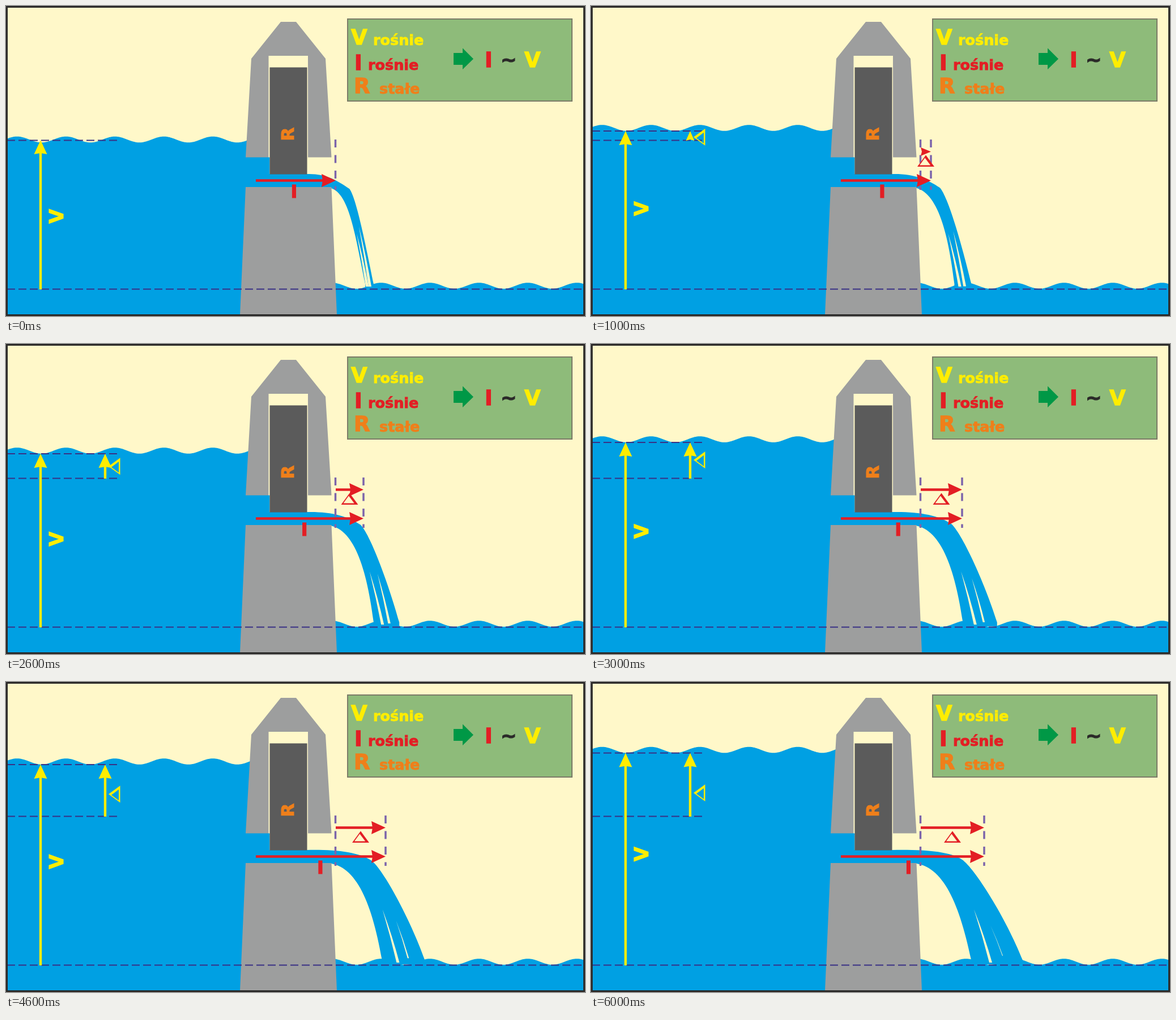
Animation, 1022 px wide and 548 px high, one loop 7 s. Source, as an HTML page with a canvas:

```html
<!DOCTYPE html>
<html lang="pl">
<head>
<meta charset="utf-8">
<title>I ~ V</title>
<style>
  html, body { margin: 0; width: 100%; height: 100%; overflow: hidden; }
  canvas { display: block; width: 1022px; height: 548px; }
</style>
</head>
<body>
<canvas id="stage" width="1022" height="548"></canvas>
<script>
const ctx = document.getElementById('stage').getContext('2d');
const C = {
  sky: '#fff8c9', water: '#00a0e3', dam: '#9d9e9e', gate: '#5b5b5b',
  panel: '#8ebb7a', panelEdge: '#7b7b68', dark: '#2b2a29', red: '#e31e24',
  yellow: '#ffed00', orange: '#ef7f1a', green: '#009846',
  dash: '#393185', mark: '#7c64ab'
};
const STEP = 1000, LOOP = 7000, UP = -Math.PI / 2;
const BASE_LEVEL = 237, LOW_LEVEL = 500, BASE_TIP = 582;
// Water rise and current growth at each step, in pixels.
const RISE = [0, 20.5, 47.5, 67.5, 95.5, 116];
const REACH = [0, 18, 49, 73, 88, 112];
const LAST = RISE.length - 1;

const mix = (a, b, t) => a + (b - a) * t;
const smooth = t => t * t * (3 - 2 * t);

function rect(x, y, w, h, color) {
  ctx.fillStyle = color;
  ctx.fillRect(x, y, w, h);
}

function poly(points, color) {
  ctx.beginPath();
  points.forEach(([x, y]) => ctx.lineTo(x, y));
  ctx.closePath();
  ctx.fillStyle = color;
  ctx.fill();
}

function line(x1, y1, x2, y2, color, width, dash = []) {
  ctx.beginPath();
  ctx.moveTo(x1, y1);
  ctx.lineTo(x2, y2);
  ctx.strokeStyle = color;
  ctx.lineWidth = width;
  ctx.setLineDash(dash);
  ctx.stroke();
  ctx.setLineDash([]);
}

const levelLine = (y, x2) => line(2, y, x2, y, C.dash, 1.8, [14, 6]);
const tipLine = x => line(x, 236, x, 325, C.mark, 3.5, [14, 13.5]);

// Centres the visible ink on x, with y as baseline; an outline adds weight.
function text(str, x, y, size, color, angle = 0) {
  ctx.save();
  ctx.translate(x, y);
  ctx.rotate(angle);
  ctx.font = `bold ${size}px "DejaVu Sans", sans-serif`;
  ctx.fillStyle = ctx.strokeStyle = color;
  ctx.lineWidth = size * 0.035;
  ctx.miterLimit = 3;
  const m = ctx.measureText(str);
  const left = (m.actualBoundingBoxLeft - m.actualBoundingBoxRight) / 2;
  ctx.fillText(str, left, -ctx.lineWidth / 2);
  ctx.strokeText(str, left, -ctx.lineWidth / 2);
  ctx.restore();
}

function arrow(x, y, length, angle, color) {
  const head = Math.min(25, length), half = head < 20 ? 7.5 : 11.5;
  ctx.save();
  ctx.translate(x, y);
  ctx.rotate(angle);
  if (length > head) line(0, 0, length - head + 4, 0, color, 4.4);
  poly([[length, 0], [length - head, -half], [length - head + 2, 0], [length - head, half]], color);
  ctx.restore();
}

function delta(x, y, color, angle = 0) {
  ctx.save();
  ctx.translate(x, y);
  ctx.rotate(angle);
  ctx.beginPath();
  [[[-15, 20.5], [0, 0], [15, 20.5]], [[-11, 18], [-1.6, 5], [8.2, 18]]].forEach(t => {
    t.forEach(([px, py], n) => n ? ctx.lineTo(px, py) : ctx.moveTo(px, py));
    ctx.closePath();
  });
  ctx.fillStyle = color;
  ctx.fill('evenodd');
  ctx.restore();
}

function sea(x1, x2, mean, crest) {
  const points = [[x2, 546], [x1, 546]];
  for (let x = x1; x <= x2; x++) {
    points.push([x, mean - 5.3 * Math.cos((x - crest) * 2 * Math.PI / 86.4)]);
  }
  poly(points, C.water);
}

// A thin slit of sky, widening from its apex down to its base.
function gap(x, y, base, bottom, width) {
  const bend = mix(x, base, 0.56), midY = (y + bottom) / 2;
  ctx.beginPath();
  ctx.moveTo(x, y);
  ctx.quadraticCurveTo(bend, midY, base, bottom);
  ctx.lineTo(base + width, bottom);
  ctx.quadraticCurveTo(bend + width * 0.7, midY, x, y);
  ctx.fillStyle = C.sky;
  ctx.fill();
}

// The jet swings from a narrow fall (p = 0) to a wide one (p = 1).
function stream(p) {
  const kneeX = mix(606, 655, p), kneeY = mix(323, 314, p);
  const outer = mix(649, 762, p), inner = mix(634, 671, p);
  ctx.beginPath();
  ctx.moveTo(465, 297);
  ctx.lineTo(531, 297);
  ctx.bezierCurveTo(mix(531, kneeX, 0.45), 296, kneeX - 22, kneeY - 15, kneeX, kneeY);
  ctx.bezierCurveTo(kneeX + mix(12, 22, p), kneeY + 15, mix(634, 733, p), 418, outer, 492);
  ctx.lineTo(outer, 499);
  ctx.lineTo(inner, 499);
  ctx.lineTo(inner, 491);
  ctx.bezierCurveTo(mix(612, 648, Math.sqrt(p)), 380, mix(602, 616, p), 317, 560, 320);
  ctx.lineTo(465, 320);
  ctx.fillStyle = C.water;
  ctx.fill();
  gap(mix(619, 676, p), 402, mix(635, 703, p), 496, 5);
  gap(mix(623, 705, p), mix(390, 430, p), mix(640, 726, p), mix(496, 484, p * p), mix(5, 1, p * p));
}

function dam() {
  poly([[485, 28], [512, 28], [564, 93], [574.5, 267.5], [533, 267.5], [533, 88],
        [463.5, 88], [463.5, 267.5], [423, 267.5], [433, 93]], C.dam);
  poly([[423, 320], [574.5, 320], [584, 546], [413, 546]], C.dam);
  rect(465.5, 108.5, 66, 189, C.gate);
  text('R', 508.5, 225.5, 31, C.orange, UP);
}

function panel() {
  rect(603, 23, 396, 145, C.panel);
  ctx.strokeStyle = C.panelEdge;
  ctx.lineWidth = 2;
  ctx.strokeRect(603, 23, 396, 145);
  text('V', 623.5, 69, 37, C.yellow);
  text('rośnie', 693.5, 69, 25.5, C.yellow);
  text('I', 622, 114, 37, C.red);
  text('rośnie', 684.5, 113, 25.5, C.red);
  text('R', 629.5, 154.5, 37, C.orange);
  text('stałe', 695, 155, 25.5, C.orange);
  poly([[790, 83], [806, 83], [806, 74.5], [825, 93.5], [806, 112], [806, 104], [790, 104]], C.green);
  text('I', 852, 109, 37, C.red);
  text('~', 887, 108, 34, C.dark);
  text('V', 929.5, 109, 37, C.yellow);
}

function draw(step) {
  const p = step / LAST;
  const wave = 236 - RISE[step], tip = BASE_TIP + REACH[step];
  const level = Math.min(BASE_LEVEL, wave + 5.5);

  rect(0, 0, 1022, 548, C.sky);
  sea(0, 433, wave, 19.5);
  rect(423, 267, 42.5, 54, C.water);
  rect(463.5, 88, 69.5, 179.5, C.sky);
  sea(570, 1022, 494.5, 662);
  stream(p);
  dam();
  panel();

  levelLine(LOW_LEVEL + 0.5, 1020);
  levelLine(BASE_LEVEL + 0.5, 202);
  tipLine(BASE_TIP - 0.5);
  if (step > 0) {
    levelLine(level, 202);
    tipLine(tip);
    arrow(175, BASE_LEVEL + 1, BASE_LEVEL + 1 - level, UP, C.yellow);
    arrow(BASE_TIP, 257.5, tip - BASE_TIP, 0, C.red);
    delta(181, 196 + 56 * (1 - p) ** 2, C.yellow, UP);
    delta((BASE_TIP + tip) / 2, 263.5, C.red);
  }

  arrow(61, LOW_LEVEL + 1, LOW_LEVEL + 1 - level, UP, C.yellow);
  text('V', 102, mix(371.5, 304, p), 33, C.yellow, UP);
  arrow(441, 308.5, tip - 441, 0, C.red);
  text('I', mix(508, 560, smooth(p)), 340, 32, C.red);

  ctx.strokeStyle = C.dark;
  ctx.lineWidth = 3;
  ctx.strokeRect(1.5, 1.5, 1019, 545);
}

function frame() {
  const step = Math.floor(performance.now() % LOOP / STEP);
  draw(Math.min(step, LAST));
  requestAnimationFrame(frame);
}
frame();
</script>
</body>
</html>
```
